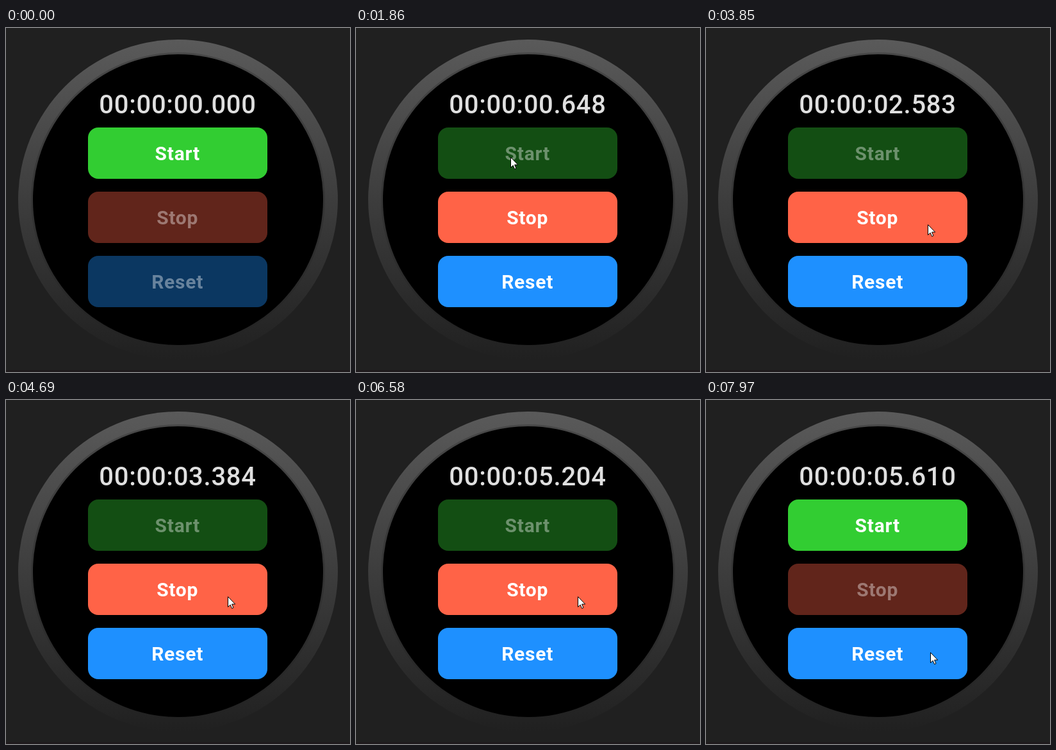
Animation, 537 px wide and 536 px high, one loop 8 s. Source, as an HTML page:

```html
<!DOCTYPE html>
<html lang="en">
<head>
<meta charset="utf-8">
<title>Stopwatch</title>
<style>
  html, body { margin: 0; width: 100%; height: 100%; overflow: hidden; background: #202020; }
  svg { display: block; }
  text { font-family: Roboto, sans-serif; text-anchor: middle; }
  #time { font-size: 40px; font-weight: 500; letter-spacing: .7px; fill: #dfdfdf; }
  .button text { font-size: 30px; font-weight: 700; letter-spacing: .76px; fill: #fff; }
  .off * { opacity: .38; }
</style>
</head>
<body>
<svg width="537" height="536" viewBox="0 0 537 536">
  <defs>
    <linearGradient id="bezel" x2="0" y2="1">
      <stop stop-color="#5a5a5a"/><stop offset="1" stop-color="#202020"/>
    </linearGradient>
    <linearGradient id="lip" x2="0" y2="1">
      <stop stop-color="#484848"/><stop offset="1" stop-color="#222"/>
    </linearGradient>
    <clipPath id="clip"><rect id="clipBox" x="128" width="280" height="80" rx="16"/></clipPath>
  </defs>
  <rect width="537" height="536" fill="#202020"/>
  <rect y="533" width="537" height="3" fill="#1f1a1d"/>
  <circle cx="268.5" cy="267.5" r="249.5" fill="url(#bezel)"/>
  <circle cx="268.5" cy="267.5" r="229.5" fill="url(#lip)"/>
  <circle cx="268.5" cy="267.5" r="226.5"/>
  <text id="time" x="268" y="133"></text>
  <g id="buttons"></g>
  <g clip-path="url(#clip)"><circle id="ripple" fill="#fff" opacity=".12"/></g>
  <path id="cursor" d="M.5 .5V16.5L4.2 13.1 6.6 18.7 9 17.7 6.6 12.1H11.7Z" fill="#fff" stroke="#000"/>
</svg>
<script>
const LOOP = 8000, FIRST = 310, STEP = 69.64;   // ms; the screen updates once per step
const START_TICK = 13, STOP_TICK = 97;
const $ = id => document.getElementById(id);

// Stopwatch reading in ms at a few ticks.
const clock = [[12.3, 0], [22, 648], [63, 3384], [74, 4114], [90, 5204], [96.1, 5610]];

// Pointer moves along quadratic curves: start point, control point, end point.
const moves = [
  { from: 0, to: 12, x: [438, 64, 241], y: [458, 122, 201] },
  { from: 29, to: 51, x: [241, 384.5, 346], y: [201, 202.5, 306] },
  { from: 97, to: 110, x: [346, 352, 350], y: [306, 393, 393] }
];

const buttons = [['Start', '#32cd32'], ['Stop', '#ff6347'], ['Reset', '#1e90ff']];
$('buttons').innerHTML = buttons.map(([label, color], i) => `<g class="button">
  <rect x="128" y="${155 + 100 * i}" width="280" height="80" rx="16" fill="${color}"/>
  <text x="267.7" y="${206 + 100 * i}">${label}</text></g>`).join('');
const groups = [...$('buttons').children];

const clamp = u => Math.max(0, Math.min(1, u));
const curve = ([a, b, c], u) => a * (1 - u) ** 2 + 2 * b * u * (1 - u) + c * u * u;

function elapsed(tick) {
  let ms = 0;
  for (let i = 1; i < clock.length; i++) {
    const [t0, v0] = clock[i - 1], [t1, v1] = clock[i];
    ms += (v1 - v0) * clamp((tick - t0) / (t1 - t0));
  }
  return Math.round(ms);
}

function pointer(tick) {
  const move = moves.filter(m => tick >= m.from).pop() || moves[0];
  const u = clamp((tick - move.from) / (move.to - move.from));
  return [Math.round(curve(move.x, u)), Math.round(curve(move.y, u))];
}

function format(ms) {
  const pad = (n, len = 2) => String(Math.floor(n)).padStart(len, '0');
  return `${pad(ms / 3600000)}:${pad(ms / 60000 % 60)}:${pad(ms / 1000 % 60)}.${pad(ms % 1000, 3)}`;
}

function showRipple(tick, x, y) {
  const press = tick < START_TICK ? START_TICK - 1 : STOP_TICK - 1;
  $('ripple').setAttribute('r', tick === press ? 94 : 0);
  $('ripple').setAttribute('cx', x);
  $('ripple').setAttribute('cy', y);
  $('clipBox').setAttribute('y', tick < START_TICK ? 155 : 255);
}

function draw(t) {
  const tick = Math.floor((t - FIRST) / STEP + .3);
  const running = tick >= START_TICK && tick < STOP_TICK;
  const enabled = [!running, running, tick >= START_TICK];
  groups.forEach((g, i) => g.classList.toggle('off', !enabled[i]));
  $('time').textContent = format(elapsed(tick));

  const [x, y] = pointer(tick);
  $('cursor').setAttribute('transform', `translate(${x} ${y})`);
  $('cursor').setAttribute('visibility', tick < 0 ? 'hidden' : 'visible');
  showRipple(tick, x, y);
}

function loop() {
  draw(performance.now() % LOOP);
  requestAnimationFrame(loop);
}
loop();
</script>
</body>
</html>
```
